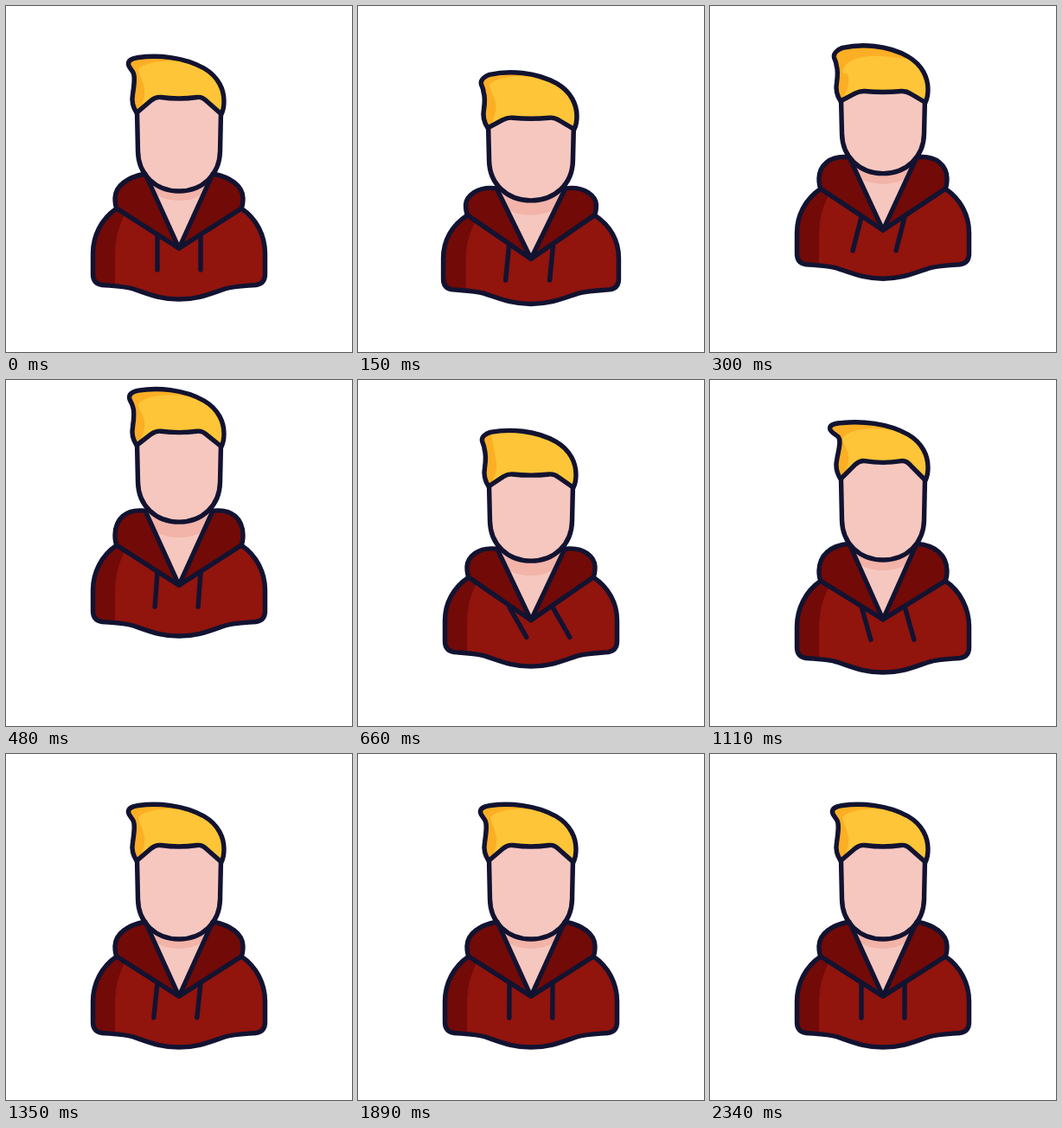
Animation, 400 px wide and 400 px high, one loop 4370 ms. Source, as an HTML page:

```html
<!DOCTYPE html>
<html lang="en">
<head>
<meta charset="utf-8">
<title>Hopping avatar</title>
<style>
  html, body { margin: 0; width: 100%; height: 100%; overflow: hidden; background: #fff; }
  svg { display: block; width: 100vw; height: 100vh; }
  .line { stroke: #121331; stroke-width: 5.4; stroke-linecap: round; stroke-linejoin: round; }
  .skin { fill: #f6c7bf; }
  .red { fill: #91140d; }
  .dark { fill: #720a07; }
  .none { fill: none; }
</style>
</head>
<body>
<svg viewBox="0 0 400 400">
  <clipPath id="hairClip"><path id="clipShape"/></clipPath>
  <g id="figure">
    <path id="neck" class="skin"/>
    <ellipse id="shadow" cx="200" rx="38" ry="24" fill="#f2b3a8"/>
    <path id="head" class="skin line"/>
    <g id="hair">
      <g clip-path="url(#hairClip)">
        <rect x="120" y="30" width="150" height="110" fill="#fcae24"/>
        <path id="shine" fill="#fdc537"/>
      </g>
      <path id="hairLine" class="line none"/>
    </g>
    <path id="body" class="red"/>
    <path id="side" class="dark"/>
    <path id="bodyLine" class="line none"/>
    <path id="cords" class="line none"/>
    <path id="lobeL" class="dark line"/>
    <path id="lobeR" class="dark line" transform="matrix(-1 0 0 1 400 0)"/>
  </g>
</svg>
<script>
const LOOP = 4370, STEP = 30, END = 2340;

// rest, crouch, peak of the hop, landing, rebound, rest
const BEATS = [0, 100, 450, 780, 1080, 1300];
const HOP = {
  body: [0, 8, -44, 7, -1, 0],
  hood: [0, 20, -44, 20, -5, 0],
  chin: [0, 12, -50, 23, -6, 0],
  hair: [0, 18, -48, 35, -9, 0],
  flat: [0, 1, 1, 1, .3, 0]
};

// cosine easing from one beat to the next
function ease(times, values, t) {
  const last = times.length - 1;
  if (t <= times[0]) return values[0];
  if (t >= times[last]) return values[last];
  const i = times.findIndex(x => x > t) - 1;
  const u = (t - times[i]) / (times[i + 1] - times[i]);
  return values[i] + (values[i + 1] - values[i]) * (1 - Math.cos(Math.PI * u)) / 2;
}

const hop = (part, t, lag = 0) => ease(BEATS, HOP[part], t - lag);

// cord angle: whipped up by the hop, then a damped pendulum
function swing(t) {
  if (t < 900) return ease([0, 380, 675, 900], [0, 16, -30, 38], t);
  const s = t - 900;
  return 38 * Math.exp(-s / 245) * Math.cos(2 * Math.PI * s / 450);
}

function poseAt(t) {
  const body = hop('body', t), hood = hop('hood', t), flat = hop('flat', t);
  const chin = hop('chin', t, 20), hair = hop('hair', t, 30);
  const speed = hair - hop('hair', t - STEP, 30);
  return {
    body, hood, flat, chin, hair,
    sag: hair - chin,                          // hair pressed onto the head
    shade: .35 - .6 * Math.tanh(speed / 6),    // grows while rising
    stretch: 1 + Math.max(0, body) * .0035,
    swing: swing(t) * Math.PI / 180
  };
}

const el = id => document.getElementById(id);
const draw = (d, ...ids) => ids.forEach(id => el(id).setAttribute('d', d));

function drawHead(p) {
  const top = 100 + p.hair, c = 214 + p.chin;
  draw(`M151 ${top}L152.5 ${c - 46}C153 ${c - 19} 173 ${c} 200 ${c}
    C227 ${c} 247 ${c - 19} 247.5 ${c - 46}L249 ${top}`, 'head');
}

function drawHair(p) {
  // the tip drops with the sag, leaning in first and flopping out later
  const x = p.sag * (11 - p.sag) / 15, y = .7 * p.sag;
  const rise = n => 124.5 - n * (1 - .05 * p.sag);
  el('hair').setAttribute('transform', `translate(0 ${p.hair})`);
  draw(`M151 123.5C146 116 145 110 146.5 102
    C148 92 ${149.5 - x} ${82 + y} ${147 - x / 2} ${77 + y}
    C${145 + x / 2} ${73 + y} ${142 + x} ${71 + y} ${141.5 + x} ${67.5 + y}
    C${141 + x} ${63 + y} ${146 + x} ${60.5 + y * .7} 153 ${59.5 + y * .5}
    C175 ${56.5 + y * .1} 205 58.5 229 72C246 82 252 97 252 110
    C252 117 251 121 249 125L232 ${rise(14.5)}
    C228 ${rise(18.5)} 225 ${rise(19.5)} 221 ${rise(19)}
    C207 ${rise(17)} 193 ${rise(17)} 179 ${rise(19)}
    C175 ${rise(19.5)} 172 ${rise(18.5)} 168 ${rise(15.5)}Z`, 'clipShape', 'hairLine');
  const low = 64 + 28 * p.shade, high = 58 + 14 * p.shade;
  draw(`M152 124C158 114 161 104 160 96C159 88 154 ${low + 6} 153 ${low}
    C156 ${high + 4} 180 ${high - 3} 215 ${high + 3}L238 76L270 60V140H152Z`, 'shine');
}

function drawTorso(p) {
  const s = 234 + p.body + .2 * (p.hood - p.body);
  const top = 194 + p.hood;
  const tip = 280 + .6 * p.hood + .4 * p.body;
  const b = n => n + p.body;
  const left = `M128 ${s}C110 ${s + 12} 100.5 ${b(266)} 100.5 ${b(286)}V${b(310)}
    Q100.5 ${b(321)} 111 ${b(322.5)}`;

  draw(`M163 ${top - 4}H237L200 ${tip}Z`, 'neck');
  el('shadow').setAttribute('cy', 201 + p.hood);

  draw(`${left}C122 ${b(323.5)} 135 ${b(323.5)} 147 ${b(327)}
    C165 ${b(333)} 178 ${b(339)} 200 ${b(339)}C222 ${b(339)} 235 ${b(333)} 253 ${b(327)}
    C265 ${b(323.5)} 278 ${b(323.5)} 289 ${b(322.5)}Q299.5 ${b(321)} 299.5 ${b(310)}
    V${b(286)}C299.5 ${b(266)} 290 ${s + 12} 272 ${s}L200 ${tip}Z`, 'body', 'bodyLine');
  draw(`${left}L126 ${b(323.5)}V${b(290)}C126 ${b(270)} 130 ${s + 20} 138 ${s + 6}Z`, 'side');

  const f = p.flat;
  draw(`M128 ${s}C126 ${s - 4} 126 ${s - 7} 126 ${s - 12}
    C126.5 ${top + 14 - 4 * f} ${140 - 2 * f} ${top + 4 - 7 * f} 161 ${top}L200 ${tip}Z`,
    'lobeL', 'lobeR');

  const dx = -40 * Math.sin(p.swing), dy = 40 * Math.cos(p.swing);
  draw([175, 225].map(x => `M${x} ${tip - 15}l${dx} ${dy}`).join(''), 'cords');
}

function render(ms) {
  const t = Math.min(END, Math.floor(ms % LOOP / STEP) * STEP);
  const p = poseAt(t);
  el('figure').setAttribute('transform', `matrix(${p.stretch} 0 0 1 ${200 - 200 * p.stretch} 0)`);
  drawHead(p);
  drawHair(p);
  drawTorso(p);
}

const start = performance.now();
function tick() {
  render(performance.now() - start);
  requestAnimationFrame(tick);
}
tick();
</script>
</body>
</html>
```
